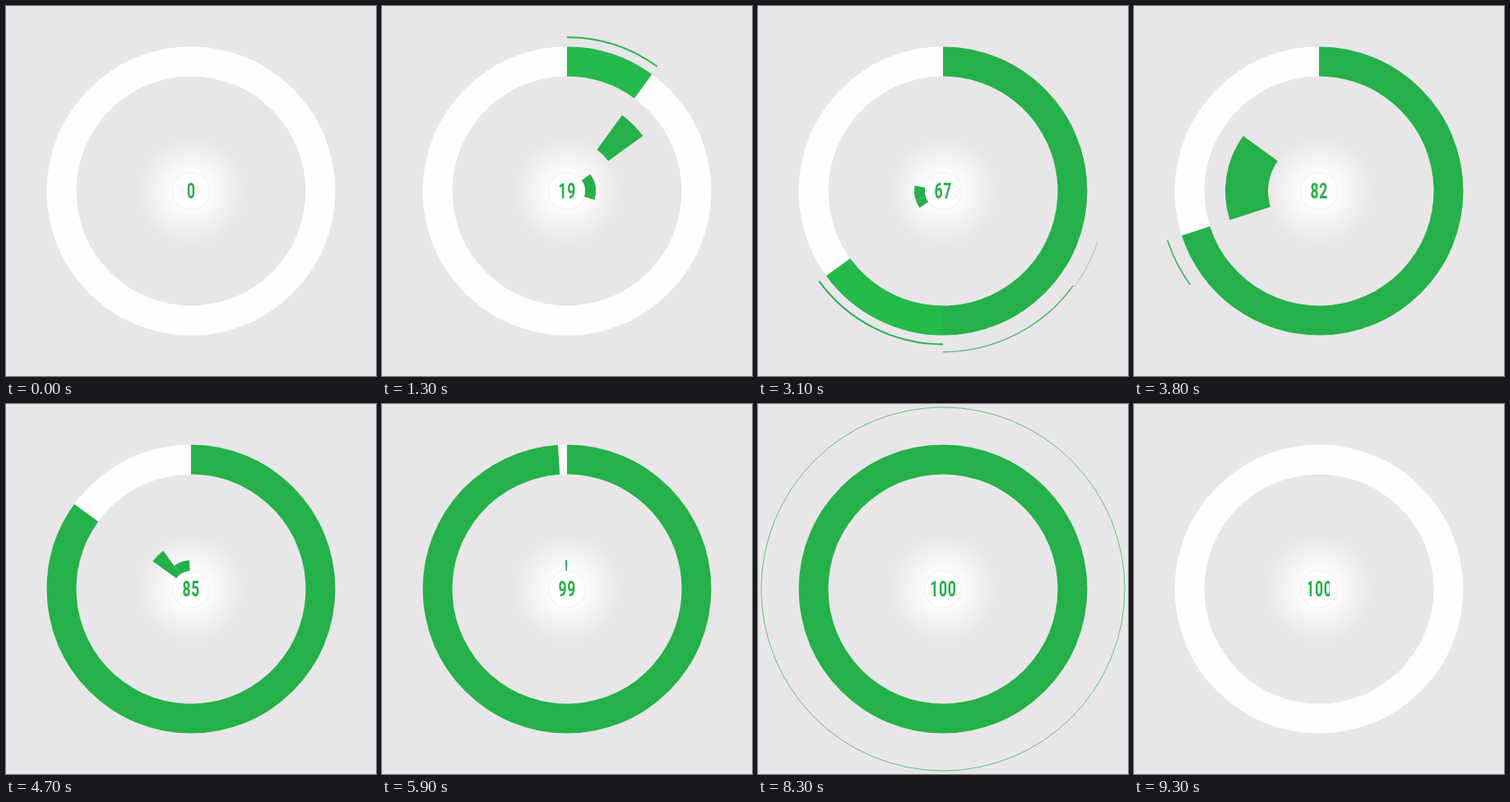
An HTML page with a canvas that plays this animation: 450 by 450 pixels, repeating every 9.4 s.

```html
<!DOCTYPE html>
<html lang="en">
<head>
<meta charset="utf-8">
<title>Progress ring</title>
<style>
  html, body { margin: 0; width: 100%; height: 100%; overflow: hidden; background: #e8e6e8; }
  canvas { display: block; width: 100vw; height: 100vh; }
</style>
</head>
<body>
<canvas width="450" height="450"></canvas>
<script>
const ctx = document.querySelector('canvas').getContext('2d');
const LOOP = 9400, STEP = 100, CENTER = 225;
const GREEN = '#25b04a', BRIGHT = '#28c44c', WHITE = '#fefefe';
const HUB = [22, 35], RING = [139.5, 175.5];
const FLIGHT = 400;

// Each group sweeps in around the hub; its pieces then fly out to the ring.
// Pieces: [from %, to %, landing time]
const groups = [
  { sweep: [600, 900], pieces: [[0, 10, 1150], [10, 15, 1400], [15, 30, 1700]] },
  { sweep: [1750, 2050], pieces: [[30, 35, 2500], [35, 50, 2720], [50, 65, 2960]] },
  { sweep: [2905, 3205], pieces: [[65, 70, 3500], [70, 85, 3900]] },
  { sweep: [4050, 4350], pieces: [[85, 90, 4940], [90, 99, 5150]] },
  { sweep: [5500, 5800], pieces: [[99, 100, 7500]] }
];
const counter = [[600, 0], [1700, 30], [2100, 30], [3100, 67], [3900, 85],
                 [4700, 85], [5300, 99], [7100, 99], [7500, 100]];

const clamp = v => Math.min(1, Math.max(0, v));
const progress = (t, a, b) => clamp((t - a) / (b - a));
const mix = (a, b, p) => a + (b - a) * p;
const easeOut = (p, power = 3) => 1 - (1 - p) ** power;
const angle = pct => pct / 100 * Math.PI * 2 - Math.PI / 2;

function sector(from, to, [inner, outer], color, alpha = 1) {
  if (to <= from || alpha <= 0) return;
  ctx.globalAlpha = alpha;
  ctx.fillStyle = color;
  ctx.beginPath();
  ctx.arc(CENTER, CENTER, outer, angle(from), angle(to));
  ctx.arc(CENTER, CENTER, inner, angle(to), angle(from), true);
  ctx.fill();
  ctx.globalAlpha = 1;
}

function ripple(from, to, radius, width, alpha) {
  ctx.globalAlpha = alpha;
  ctx.strokeStyle = GREEN;
  ctx.lineWidth = width;
  ctx.beginPath();
  ctx.arc(CENTER, CENTER, radius, angle(from), angle(to));
  ctx.stroke();
  ctx.globalAlpha = 1;
}

function drawPiece([from, to, land], sweptTo, t) {
  const p = progress(t, land - FLIGHT, land);
  const inner = mix(HUB[0], RING[0], clamp((p - 0.4) / 0.6) ** 2);
  const outer = mix(HUB[1], RING[1], p * p);
  sector(from, Math.min(to, sweptTo), [inner, outer], GREEN);
}

function drawLanding([from, to, land], t) {
  const age = t - land;
  sector(from, to, RING, BRIGHT, 1 - age / 300);
  if (to === 100) {
    const p = age / 1400;
    if (p < 1) ripple(0, 100, mix(175, 225, easeOut(p)), mix(2, 0.8, clamp(p * 2)), 1 - p ** 4);
  } else {
    const p = age / 750;
    if (p < 1) ripple(from, to, mix(175, 198, easeOut(p, 3.3)), mix(2.3, 0.8, p), 1 - p * p);
  }
}

function countAt(t) {
  let value = 0;
  for (let i = 1; i < counter.length; i++) {
    const [t0, v0] = counter[i - 1], [t1, v1] = counter[i];
    if (t >= t0) value = mix(v0, v1, progress(t, t0, t1));
  }
  return Math.floor(value + 0.001);
}

function drawHub(t) {
  ctx.save();
  ctx.shadowColor = 'rgba(90, 90, 90, .22)';
  ctx.shadowBlur = 2;
  ctx.fillStyle = WHITE;
  ctx.beginPath();
  ctx.arc(CENTER, CENTER, 22, 0, Math.PI * 2);
  ctx.fill();
  ctx.restore();

  ctx.save();
  const closing = progress(t, 9200, 9300);
  ctx.beginPath();
  ctx.rect(CENTER - mix(22, 13, closing), 200, mix(44, 26, closing), 50);
  ctx.clip();
  // Condensed numerals
  ctx.translate(CENTER, 234);
  ctx.scale(0.7, 1);
  ctx.font = '700 25px Roboto, "Liberation Sans", sans-serif';
  ctx.letterSpacing = '1px';
  ctx.textAlign = 'center';
  ctx.fillStyle = GREEN;
  ctx.fillText(countAt(t), 0.5, 0);
  ctx.restore();
}

function drawBackground() {
  ctx.fillStyle = '#e8e6e8';
  ctx.fillRect(0, 0, 450, 450);
  const glow = ctx.createRadialGradient(CENTER, CENTER, 18, CENTER, CENTER, 66);
  glow.addColorStop(0, 'rgba(255, 255, 255, 1)');
  glow.addColorStop(0.5, 'rgba(255, 255, 255, .5)');
  glow.addColorStop(1, 'rgba(255, 255, 255, 0)');
  ctx.fillStyle = glow;
  ctx.fillRect(150, 150, 150, 150);
  sector(0, 100, RING, WHITE);
}

function draw(t) {
  drawBackground();
  const landed = groups.flatMap(g => g.pieces).filter(p => t >= p[2]);
  const filled = landed.length ? landed[landed.length - 1][1] : 0;
  sector(0, filled, RING, GREEN, 1 - progress(t, 8800, 9200));
  landed.forEach(piece => drawLanding(piece, t));

  for (const { sweep, pieces } of groups) {
    const sweptTo = mix(pieces[0][0], pieces[pieces.length - 1][1], progress(t, ...sweep));
    for (const piece of pieces) if (t < piece[2]) drawPiece(piece, sweptTo, t);
  }
  drawHub(t);
}

const start = performance.now();
function tick() {
  const t = Math.max(0, performance.now() - start) % LOOP;
  draw(Math.floor(t / STEP) * STEP);
  requestAnimationFrame(tick);
}
tick();
</script>
</body>
</html>
```
